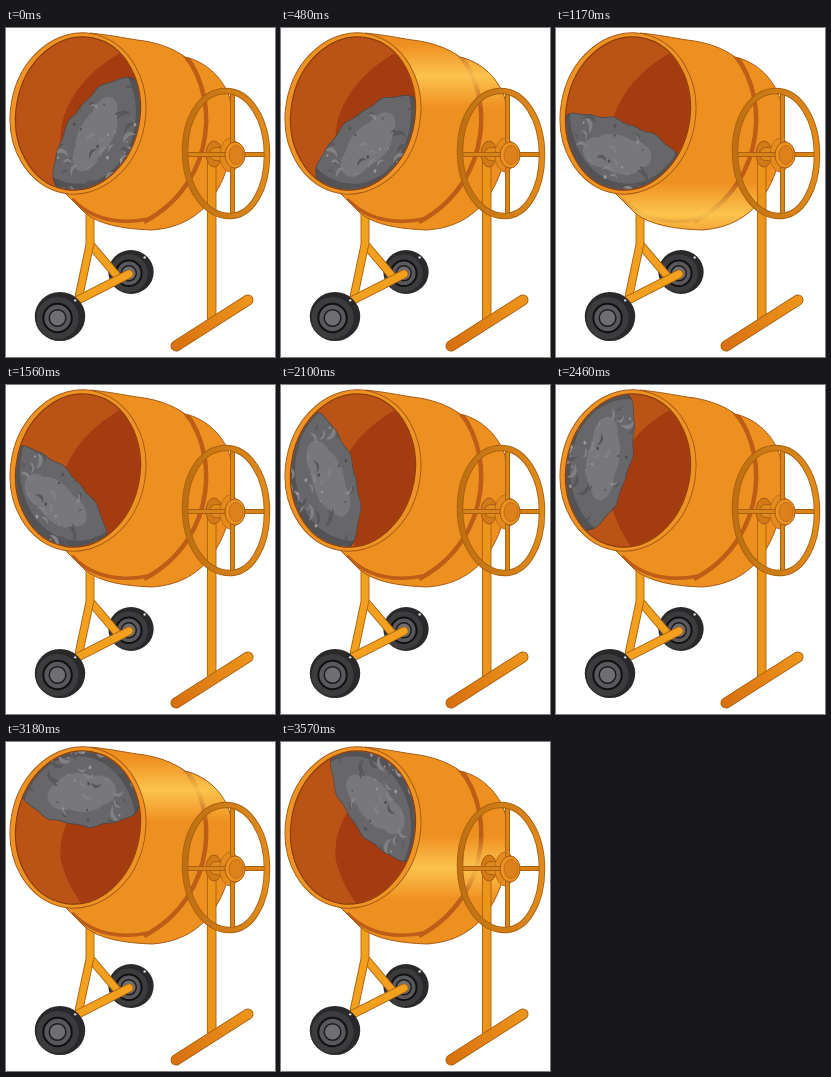
An HTML page for the animation above (3600 ms loop, 269 by 329 pixels).

```html
<!DOCTYPE html>
<html>
<head>
<meta charset="utf-8">
<style>
  html, body { margin: 0; width: 100%; height: 100%; overflow: hidden; background: #fff; }
  svg { display: block; width: 269px; height: 329px; }
  .rod { fill: none; stroke-linecap: round; stroke-linejoin: round; }
</style>
</head>
<body>
<svg viewBox="0 0 269 329">
  <defs>
    <linearGradient id="glow" x1="0" y1="0" x2="0" y2="1">
      <stop offset="0" stop-color="#ffc952" stop-opacity="0"/>
      <stop offset=".5" stop-color="#ffc952" stop-opacity=".9"/>
      <stop offset="1" stop-color="#ffc952" stop-opacity="0"/>
    </linearGradient>
    <linearGradient id="rim" gradientUnits="userSpaceOnUse" x1="178" y1="0" x2="262" y2="0">
      <stop offset="0" stop-color="#bd6f12"/>
      <stop offset="1" stop-color="#e28b1b"/>
    </linearGradient>
    <linearGradient id="foot" gradientUnits="userSpaceOnUse" x1="168" y1="318" x2="244" y2="270">
      <stop offset="0" stop-color="#d8700f"/>
      <stop offset="1" stop-color="#ee951c"/>
    </linearGradient>
    <path id="drum" d="M84 5C104 7 118 10 131 12C150 14 167 20 179 29C201 34 218 51 224 71C229 100 228 136 209 166C195 188 174 200 146 202C118 201 94 197 79 185L58 164Z"/>
    <clipPath id="inDrum"><use href="#drum"/></clipPath>
    <clipPath id="inMouth"><ellipse cx="72" cy="85.500" rx="61.5" ry="76.500" transform="rotate(10 72 85.500)"/></clipPath>
    <clipPath id="inMass"><path class="mass"/></clipPath>
  </defs>

  <!-- road wheels and leg -->
  <g id="leg"></g>

  <!-- drum -->
  <use href="#drum" fill="#ee9020"/>
  <g clip-path="url(#inDrum)">
    <path d="M172 20C214 58 214 154 138 194" fill="none" stroke="#bd5d18" stroke-width="4.5"/>
    <path d="M66 171C88 194 116 196 142 191" fill="none" stroke="#bd5d18" stroke-width="3.5"/>
    <rect id="shine" x="50" width="190" height="64" fill="url(#glow)"/>
  </g>
  <use href="#drum" fill="none" stroke="#a85b16"/>

  <!-- mouth -->
  <g transform="rotate(10 72 85.500)">
    <ellipse cx="72" cy="85.500" rx="67.500" ry="81" fill="#ef9422" stroke="#a85b16"/>
    <ellipse cx="72" cy="85.500" rx="62" ry="77" fill="#bb5317" stroke="#8a3d0e" stroke-width="1.2"/>
  </g>
  <g clip-path="url(#inMouth)">
    <path d="M130 18C88 33 49 76 55 119C60 138 67 150 78 166H150V18Z" fill="#a53c10"/>
    <g id="load">
      <path class="mass" fill="#535356" stroke="#47474a" stroke-width=".02"/>
      <g clip-path="url(#inMass)">
        <circle r=".92" fill="#67676a"/>
        <g id="grit"></g>
      </g>
    </g>
  </g>

  <!-- stand and hand wheel -->
  <g id="stand"></g>
</svg>
<script>
const $ = id => document.getElementById(id);
const masses = document.querySelectorAll('.mass');

// Outlined rod
const rod = (d, w, fill = '#f3a01f') =>
  [[w, '#a9610f'], [w - 1.8, fill]].map(([width, color]) =>
    `<path class="rod" d="${d}" stroke="${color}" stroke-width="${width}"/>`).join('');

const disc = (x, y, rx, ry, fill, extra = '') =>
  `<ellipse cx="${x}" cy="${y}" rx="${rx}" ry="${ry}" fill="${fill}" ${extra}/>`;

// Tyre with its face turned slightly to the lower left
const tyre = (x, y, r) => {
  const fx = x - r * .1, fy = y + r * .06;
  return disc(x, y, r * 1.03, r, '#29292b') +
    disc(fx, fy, r * .86, r * .86, '#3c3c3f') +
    disc(fx, fy, r * .58, r * .58, '#59595d', 'stroke="#111" stroke-width="2"') +
    disc(fx, fy, r * .34, r * .34, '#6e6e73', 'stroke="#1c1c1e" stroke-width="1.5"') +
    disc(x + r * .62, y - r * .66, 1.2, 1.2, '#d8d8da');
};

$('leg').innerHTML =
  tyre(125, 244, 22) +
  rod('M84 180V216L112 249', 8.5) + rod('M84 180V216L73 268', 8.5) +
  `<path class="rod" d="M84 182V216" stroke="#f3a01f" stroke-width="6.7"/>` +
  rod('M72 272L123 246', 9) + tyre(54, 288.500, 24.500);

const ring = 'M220 63C243 63 261 91 261 127C261 162 245 188 224 188C199 188 179 160 179 123C179 88 197 63 220 63Z';
$('stand').innerHTML =
  rod('M205.700 132V290', 9.5, '#ec951b') + rod('M170 318L242 272', 11, 'url(#foot)') +
  disc(208, 126, 8, 13, '#d27a18', 'stroke="#a85b16"') +
  rod('M210 126L224 127', 14, '#e08a1c') +
  disc(224, 127, 10, 17, '#e38c1d', 'stroke="#b9661a" stroke-width=".8"') +
  rod('M226.500 65V187', 5, '#d98418') + rod('M181 126.500H259', 5, '#d98418') +
  rod(ring, 6.5, 'url(#rim)') +
  disc(229, 127, 10, 13, '#ec921f', 'stroke="#a85b16"') +
  disc(230, 127, 7, 9.5, '#dc811b', 'stroke="#b9661a" stroke-width=".8"');

// Seeded texture for the concrete
let seed = 11;
const rnd = () => (seed = seed * 16807 % 2147483647) / 2147483647;
const smear = color => {
  const x = rnd() * 1.1, y = rnd() * 1.9 - .95, s = .05 + rnd() * .07, turn = rnd() * 120 - 120;
  return `<path transform="translate(${x} ${y}) rotate(${turn}) scale(${s})" fill="${color}"
    d="M-1 .3C-.7 -.8 .6 -.9 1 .2C.4 -.2 -.2 -.2 -1 .3Z"/>`;
};
let grit = disc(.42, 0, .25, .42, '#78787b') + disc(.34, -.28, .17, .24, '#78787b') +
  disc(.48, .3, .19, .26, '#78787b');
for (let i = 0; i < 18; i++) grit += smear('#58585b') + smear('#828285');
for (let i = 0; i < 20; i++) {
  const r = .009 + rnd() * .016;
  grit += disc(rnd() * 1.1, rnd() * 1.9 - .95, r, r, i % 3 ? '#98989b' : '#505053');
}
$('grit').innerHTML = grit;

// time, heading in degrees, chord offset, bulge
const poses = [
  [0, 42, .405, .43], [480, 57, .4, .34], [900, 90, .29, .14], [1560, 129.5, .43, .31],
  [2100, 161, .41, .42], [2790, 233, .31, .3], [3570, 317.5, .43, .38], [3600, 321, .43, .38]
];

function poseAt(t) {
  const i = poses.findIndex(p => p[0] > t), a = poses[i - 1], b = poses[i];
  const k = (t - a[0]) / (b[0] - a[0]);
  return a.map((v, n) => v + (b[n] - v) * k);
}

function surface(chord, bulge) {
  let d = 'M1.3 -1.2';
  for (let i = -30; i <= 30; i++) {
    const v = i / 25;
    const hump = bulge * Math.max(0, 1 - v * v) ** .62;
    const x = chord - hump + .014 * Math.sin(v * 9 + 3) + .01 * Math.sin(v * 17 + 1);
    d += `L${x.toFixed(3)} ${(v * .94).toFixed(3)}`;
  }
  return d + 'L1.3 1.2Z';
}

function draw(now) {
  const t = Math.floor(now % 3600 / 30) * 30;
  const [, heading, chord, bulge] = poseAt(t);
  const d = surface(chord, bulge);
  masses.forEach(m => m.setAttribute('d', d));
  $('load').setAttribute('transform', `translate(72 85) scale(63 77) rotate(${heading})`);
  $('grit').setAttribute('transform', `translate(${chord - bulge} 0)`);
  $('shine').setAttribute('y', -80 + t % 2700 * .2);
}

const start = performance.now();
function tick() {
  draw(performance.now() - start);
  requestAnimationFrame(tick);
}
tick();
</script>
</body>
</html>
```
